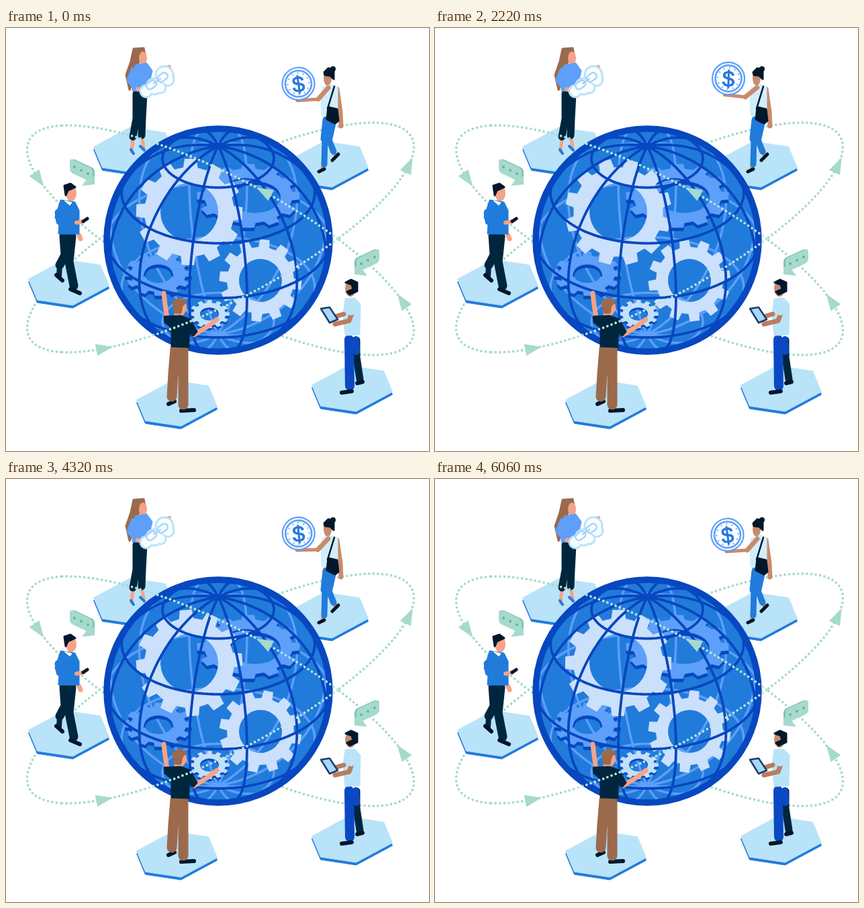
Animation of 630 by 630 pixels, one loop 6.12 s. Source, as an HTML page:

```html
<!DOCTYPE html>
<html lang="en">
<head>
<meta charset="utf-8">
<title>Connected world</title>
<style>
html, body { margin: 0; width: 100%; height: 100%; overflow: hidden; background: #fff; }
svg { display: block; width: 100vw; height: 100vh; }
.line { fill: none; stroke-linecap: round; stroke-linejoin: round; }
.dots { stroke-width: 3.8; stroke-dasharray: 0 6.6; }
.coin { font: 33px "Liberation Sans", Arial, sans-serif; }
</style>
</head>
<body>
<svg id="stage" viewBox="0 0 630 630"></svg>
<script>
const NS = "http://www.w3.org/2000/svg";
const C = {
  deep: "#0747bf", blue: "#217bdb", sky: "#5d9ff9", pale: "#cbe0fc", ice: "#b9e3f9",
  navy: "#00263e", ink: "#00172c", skin: "#f5a386", tan: "#c98b6c", brown: "#9b6a4d",
  mint: "#a6dacd", mintDark: "#7fc4b1", foam: "#b6e6d8", cloud: "#fafdff"
};
let layer = document.getElementById("stage");

function add(tag, attrs) {
  const el = document.createElementNS(NS, tag);
  for (const key in attrs) el.setAttribute(key, attrs[key]);
  return layer.appendChild(el);
}
// Draws into a nested group and returns it
function group(transform, paint) {
  const outer = layer;
  layer = add("g", { transform });
  paint();
  const made = layer;
  layer = outer;
  return made;
}
const rad = deg => deg * Math.PI / 180;
const fill = (color, d) => add("path", { d, fill: color, "fill-rule": "evenodd" });
const line = (color, width, d) => add("path", { d, stroke: color, "stroke-width": width, class: "line" });
const limb = (color, width, points) => line(color, width, "M" + points);
const oval = (color, cx, cy, rx, ry = rx) => add("ellipse", { cx, cy, rx, ry, fill: color });
const ring = (r, stroke, width, inside = "none") =>
  add("circle", { r, fill: inside, stroke, "stroke-width": width });
// Polygon with softened corners
const body = (color, points, soft = 3) => add("polygon", {
  points, fill: color, stroke: color, "stroke-width": soft, "stroke-linejoin": "round"
});
const curve = (from, to, at) => {
  const n = 120;
  return "M" + Array.from({ length: n + 1 }, (_, i) =>
    at(from + (to - from) * i / n).map(v => v.toFixed(1)).join(" ")).join("L");
};

// Orbits: one tilted ellipse and its mirror image
const FRONT = 215, NODE = 308;
const orbit = flip => deg => [
  319.5 + 288 * Math.cos(rad(deg)),
  (flip > 0 ? 316 : 312) + flip * 171 * Math.cos(rad(deg - 38))
];
const dots = (flip, from, to, color) =>
  line(color, 3.8, curve(from, to, orbit(flip))).classList.add("dots");
function arrow(flip, deg) {
  const [x, y] = orbit(flip)(deg), [u, v] = orbit(flip)(deg - flip);
  const turn = Math.atan2(v - y, u - x) * 180 / Math.PI;
  group(`translate(${x} ${y}) rotate(${turn})`, () => fill(C.mint, "M13 0L-12 -9V9Z"));
}

// Hexagonal floor tile, symmetric about its centre
function tile(x, y) {
  const half = [[-60, -5], [-6, -34], [47, -26]];
  const points = [...half, ...half.map(([a, b]) => [-a, -b])].join(" ");
  for (const [color, drop] of [[C.blue, 4], [C.ice, 0]])
    group(`translate(${x} ${y + drop})`, () => body(color, points, 1));
}

// Toothed wheel with a hole, squashed when lying flat
function wheel(outer, root, hole, flat = 1, hx = 0, hy = 0) {
  const teeth = 12, pitch = 360 / teeth, points = [];
  for (let i = 0; i < teeth; i++)
    for (const [r, side] of [[root, -.31], [outer, -.22], [outer, .22], [root, .31]]) {
      const a = rad((i + side) * pitch);
      points.push(`${(r * Math.cos(a)).toFixed(1)} ${(r * Math.sin(a) * flat).toFixed(1)}`);
    }
  const arc = way => `a${hole} ${hole * flat} 0 1 0 ${2 * way * hole} 0`;
  return `M${points.join("L")}ZM${hx - hole} ${hy}${arc(1)}${arc(-1)}Z`;
}
function flatWheel(color, x, y, depth, ...spec) {
  group(`translate(${x} ${y})`, () => {
    const d = wheel(...spec);
    group(`translate(0 ${depth})`, () => fill(C.deep, d));
    fill(color, d);
  });
}

// Globe grid on a tilted sphere, front or back half
const MID = 316, R = 166, SIN = .845, COS = .52;
function gridLine(front, at) {
  let d = "", pen = false;
  for (let i = 0; i <= 120; i++) {
    const [lat, lon] = at(i / 120).map(rad);
    const up = Math.sin(lat), out = Math.cos(lat) * Math.cos(lon);
    const seen = (COS * up + SIN * out >= 0) === front;
    const x = MID + R * Math.cos(lat) * Math.sin(lon), y = MID - R * (SIN * up - COS * out);
    if (seen) d += `${pen ? "L" : "M"}${x.toFixed(1)} ${y.toFixed(1)}`;
    pen = seen;
  }
  return d;
}
function grid(front, color, width) {
  let d = "";
  for (let lat = -60; lat <= 60; lat += 30) d += gridLine(front, u => [lat, u * 360 - 180]);
  for (let lon = -165; lon < 180; lon += 30) d += gridLine(front, u => [u * 180 - 90, lon]);
  line(color, width, d);
}

function bubble(x, y, dir) {
  group(`translate(${x} ${y}) scale(${dir} 1)`, () => {
    const plate = (color, dx) => group(`translate(${dx} 0) skewY(25)`, () =>
      add("rect", { x: -18, y: -11, width: 34, height: 21, rx: 5, fill: color }));
    plate(C.mintDark, 3);
    fill(C.mint, "M8 11L0 22 19 20V8Z");
    plate(C.mint, 0);
    for (const i of [-1, 0, 1]) oval("#63b49f", i * 10 - 1, i * 5 - 1, 2);
  });
}

// Scene behind the people
for (const flip of [1, -1]) dots(flip, NODE, FRONT + 360, C.mint);
for (const [x, y] of [[93.500, 379], [190.500, 182], [479.500, 203], [254.500, 559], [515.500, 537]]) tile(x, y);

add("circle", { cx: MID, cy: MID, r: 168, fill: C.blue });
grid(false, C.sky, 3.4);
flatWheel(C.sky, 361, 250, 5, 77, 66, 38, .62, 10, 2);
limb(C.deep, 2.5, "331 232Q352 219 376 229");
flatWheel(C.sky, 227, 366, 5, 50, 41, 21, .66);
limb(C.deep, 2.5, "206 369C210 349 246 351 248 369");
const gears = [
  { x: 273, y: 274, phase: 1.5, dir: 1, size: [79.5, 67, 43] },
  { x: 379, y: 376, phase: 6, dir: -1, size: [61.5, 50, 32] }
];
for (const g of gears) g.el = group("", () => fill(C.pale, wheel(...g.size)));
flatWheel("#c2e0fb", 303, 426, 3, 30, 24, 14, .7);
grid(true, C.deep, 3.8);
group(`translate(${MID} ${MID})`, () => ring(166, C.deep, 9.5));
bubble(113, 213, 1);
bubble(538, 347, -1);

function womanWithCloud() {
  limb(C.skin, 5, "189 165 187 184M202 160 205 178");
  limb(C.blue, 4, "186 181 190 187M200 176 206 182");
  limb(C.navy, 11, "194 98 194 135 189 162M205 98 203 135 202 160");
  body(C.brown, "190 31 205 30 207 40 197 52 195 70 184 92 179 70 186 50");
  oval(C.skin, 204, 45, 6, 10);
  body(C.sky, "193 56 209 53 217 64 210 93 189 93");
  limb(C.sky, 9, "190 63 184 78 194 89");
  limb(C.skin, 6, "234 64 243 58M196 91 204 93");
  const puffs = [[209, 94, 9], [221, 87, 12], [236, 70, 13], [241, 77, 9], [230, 89, 8]];
  for (const [color, grow] of [[C.ice, 1.5], [C.cloud, -1.5]])
    for (const [x, y, r] of puffs) oval(color, x, y, r + grow);
  group("translate(225 79) rotate(-34)", () => {
    for (const x of [-18, 2])
      add("rect", { x, y: -5, width: 16, height: 10, rx: 5, fill: "none", stroke: "#a8d4f8", "stroke-width": 2.5 });
    limb("#a8d4f8", 2.5, "-6 0 6 0");
  });
}

function manWithPhone() {
  limb(C.navy, 13, "98 310 94 348 101 384M86 310 88 338 80 353");
  limb(C.navy, 8, "80 353 79 369");
  limb(C.ink, 6, "75 368 84 376M96 389 110 395");
  limb(C.skin, 7, "109 309 111 314");
  oval(C.skin, 97, 246, 8, 12);
  body(C.ink, "87 235 96 232 103 237 92 242 89 249");
  body(C.blue, "82 257 102 260 108 272 108 306 79 306 80 290 74 282");
  body("#fff", "87 257 98 260 95 264", 1);
  limb(C.blue, 11, "78 275 80 288 101 290");
  limb(C.skin, 6, "105 290 115 288");
  limb(C.ink, 5, "115 288 121 284");
}

function womanWithCoin() {
  limb(C.tan, 7, "493 91 498 125 499 146");
  limb(C.tan, 6, "485 183 492 190M473 198 472 211");
  limb(C.ink, 5, "466 214 474 210M486 197 495 188");
  limb(C.blue, 13, "478 137 475 165M486 137 480 164");
  limb(C.blue, 9, "475 165 474 203M480 164 488 184");
  oval(C.tan, 479, 74, 6, 12);
  body(C.ink, "474 66 480 60 488 62 488 76 483 71 475 70");
  oval(C.ink, 487, 61, 4);
  body("#d2eefb", "472 89 485 85 493 89 493 132 471 130 470 104");
  limb(C.ink, 2.5, "489 87 479 120");
  body(C.ink, "480 118 493 121 495 138 490 142 478 136");
  return group("", () => {
    limb(C.tan, 7, "480 89 465 106");
    limb(C.tan, 5, "465 106 434 108");
    group("translate(435.5 83) rotate(-8)", () => {
      ring(24, C.sky, 2.2, C.cloud);
      ring(19.5, C.sky, 2.6);
      ring(16, C.sky, 2.5).setAttribute("stroke-dasharray", "1.5 6.878");
      const sign = add("text", { y: 12, "text-anchor": "middle", fill: "#2877dd", stroke: "#2877dd", class: "coin" });
      sign.textContent = "$";
    });
  });
}

function manWithTablet() {
  limb(C.navy, 11, "522 465 522 490 527 523");
  limb("#0a49c3", 14, "511 464 512 533");
  limb("#0a49c3", 10, "521 464 522 482");
  limb(C.ink, 6, "500 543 515 541M523 529 531 527");
  oval(C.tan, 513, 388, 8, 12);
  body(C.ink, "506 379 514 375 523 379 523 392 512 397 508 393 517 389 515 382");
  body(C.ice, "506 404 519 403 527 412 526 456 506 457 503 427");
  limb("#b97d5c", 7, "515 425 511 436 490 441M503 426 490 430");
  limb(C.ice, 12, "515 412 514 422");
  add("polygon", {
    points: "469 418 482 416 494 434 482 439", fill: "#a6d8fa",
    stroke: "#1d3c68", "stroke-width": 2.5, "stroke-linejoin": "round"
  });
}

function manAtGlobe() {
  limb(C.ink, 6, "242 560 251 556M261 570 280 569");
  limb(C.brown, 15, "252 478 249 515 247 549M264 478 264 515 264 561");
  limb(C.skin, 7, "240 432 237 412 235 395M280 457 301 444 314 434");
  body(C.skin, "252 412 267 412 268 419 261 429 252 428");
  body(C.brown, "249 408 258 403 268 407 262 414 260 424 252 424");
  body(C.navy, "236 430 260 429 273 434 284 452 279 458 272 452 272 475 247 474 247 446 237 438");
}

womanWithCloud();
manWithPhone();
const arm = womanWithCoin();
manWithTablet();
manAtGlobe();

// Orbit parts in front of everything
for (const flip of [1, -1]) {
  dots(flip, FRONT, 247, C.mint);
  dots(flip, 247, NODE, C.foam);
}
for (const deg of [160, 283, -20]) arrow(1, deg);
for (const deg of [-13, 233]) arrow(-1, deg);

const STEP = 60, COUNT = 102, PEAK = 34, REST = 83, LIFT = 10.5, SPIN = 120;
const lift = k => LIFT * Math.max(0, Math.min(k / PEAK, (REST - k) / (REST - PEAK)));

const start = performance.now();
function draw(now) {
  const k = Math.floor(Math.max(0, now - start) / STEP) % COUNT;
  for (const { el, x, y, phase, dir } of gears)
    el.setAttribute("transform", `translate(${x} ${y}) rotate(${phase + dir * SPIN * k / COUNT})`);
  arm.setAttribute("transform", `rotate(${lift(k)} 482 88)`);
  requestAnimationFrame(draw);
}
draw(start);
</script>
</body>
</html>
```
